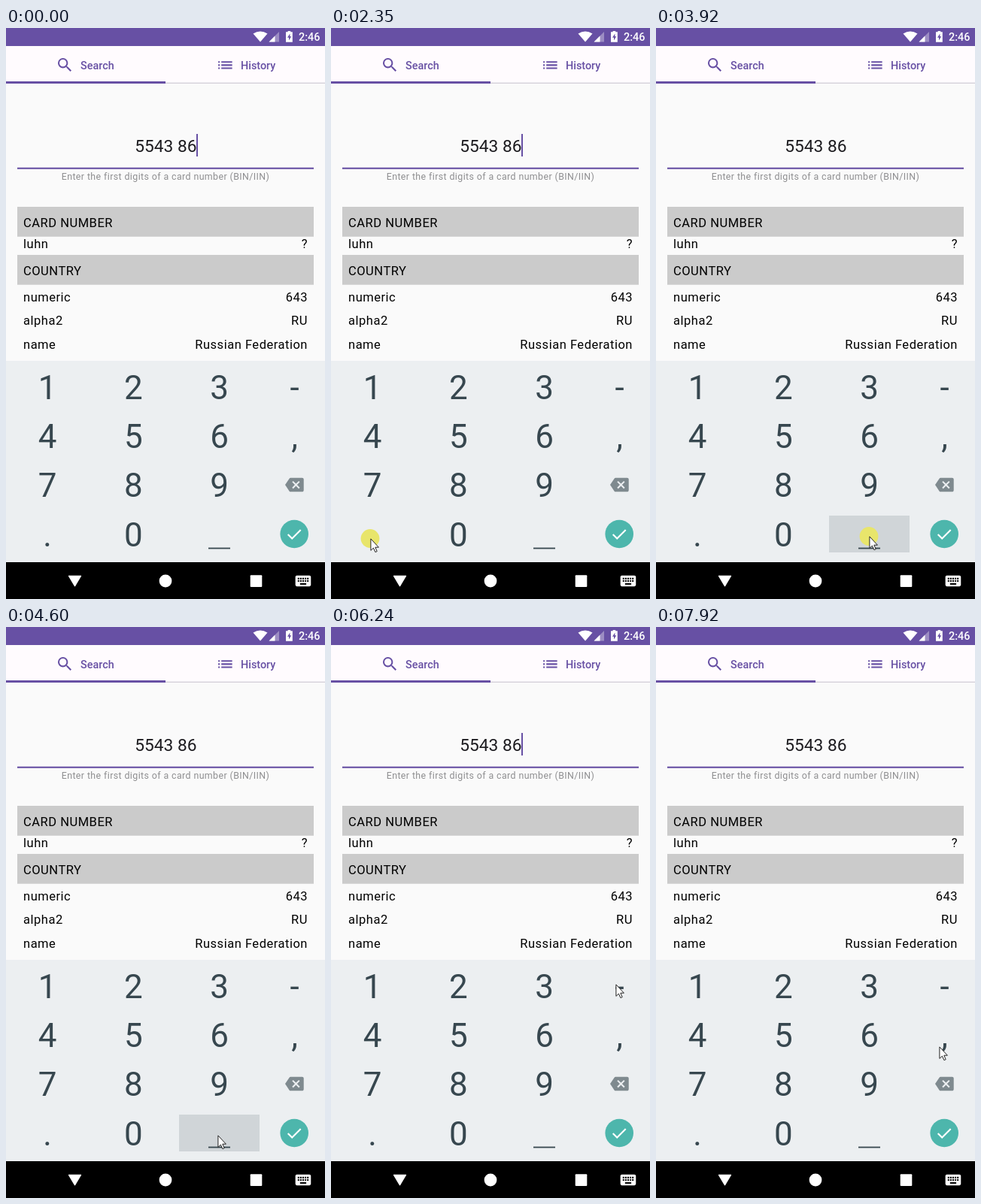
Animation of 424 by 760 pixels, one loop 8 s. Source, as an HTML page:

```html
<!DOCTYPE html>
<html lang="en">
<head>
<meta charset="utf-8">
<title>Card number lookup</title>
<style>
  html, body { margin: 0; width: 100%; height: 100%; overflow: hidden; background: #fafafa; }
  svg { display: block; width: 424px; height: 760px; font-family: Roboto, sans-serif; }

  .purple { fill: #6750a4; }
  .tab { font-size: 14.4px; font-weight: 500; }
  .input { font-size: 22.7px; fill: #1c1b1f; text-anchor: middle; }
  .hint { font-size: 12.37px; letter-spacing: .412px; fill: #8e8e90; text-anchor: middle; }
  .list { font-size: 16.5px; letter-spacing: .515px; }
  .end { text-anchor: end; }
  .keys { font-size: 44px; fill: #37474f; text-anchor: middle; }
  .press { fill: #d0d5d8; }

  .anim { animation: 8s step-end infinite; }
  .press, .dot { opacity: 0; }
  .caret { animation-name: blink; }
  .dot { animation-name: click; fill: #e8e56b; }
  .period { animation-name: period; }
  .space { animation-name: space; }
  .minus { animation-name: minus; }
  .comma { animation-name: comma; }
  .pointer { animation: move 8s linear infinite; }

  @keyframes blink {
    0%, 12.56%, 25.125%, 37.69%, 50.25%, 62.81%, 75.375%, 87.94% { opacity: 1; }
    6.28%, 18.85%, 31.41%, 43.97%, 56.53%, 69.09%, 81.66%, 94.22%, 100% { opacity: 0; }
  }
  @keyframes click {
    14.25%, 21.875%, 29.375%, 39.375%, 48.125%, 55%, 72%, 79.625%, 88%, 95.75% { opacity: 1; }
    0%, 16.125%, 23.625%, 31.125%, 42.375%, 49.875%, 56.625%, 73.75%, 82.125%, 89.75%, 97.375%, 100% { opacity: 0; }
  }
  @keyframes period {
    15.125%, 22.75%, 30.125% { opacity: 1; }
    0%, 18.5%, 25.125%, 32%, 100% { opacity: 0; }
  }
  @keyframes space {
    40.25%, 49%, 55.875% { opacity: 1; }
    0%, 43.125%, 50.625%, 58.375%, 100% { opacity: 0; }
  }
  @keyframes minus {
    72.875%, 80.5%, 88.875% { opacity: 1; }
    0%, 75.375%, 83%, 91.125%, 100% { opacity: 0; }
  }
  @keyframes comma {
    96.5% { opacity: 1; }
    98.25% { opacity: .5; }
    0%, 99%, 100% { opacity: 0; }
  }
  @keyframes move {
    0% { transform: translate(347px, 770px); animation-timing-function: step-end; }
    3.25% { transform: translate(347px, 750px); animation-timing-function: ease-in-out; }
    12.625% { transform: translate(57px, 683px); }
    13.375% { transform: translate(54px, 681px); animation-timing-function: step-end; }
    27.625% { transform: translate(52px, 679px); animation-timing-function: step-end; }
    31.125% { transform: translate(52px, 680px); animation-timing-function: ease-in-out; }
    34.375% { transform: translate(270px, 680px); animation-timing-function: step-end; }
    37.75% { transform: translate(283px, 676px); animation-timing-function: step-end; }
    52.5% { transform: translate(281px, 676px); animation-timing-function: step-end; }
    61.625% { transform: translate(281px, 676px); animation-timing-function: ease-in-out; }
    71.125% { transform: translate(378px, 474px); animation-timing-function: step-end; }
    77.125% { transform: translate(378px, 475px); animation-timing-function: step-end; }
    91.375% { transform: translate(378px, 475px); animation-timing-function: ease-in-out; }
    95.625%, 100% { transform: translate(376px, 558px); }
  }
</style>
</head>
<body>
<svg viewBox="0 0 424 760">
  <rect width="424" height="760" fill="#fafafa"/>

  <!-- Status bar -->
  <rect class="purple" width="424" height="24"/>
  <g fill="#fff">
    <path d="M338 18.5 328.5 7.4Q338 1.6 347.5 7.4Z"/>
    <path d="M363 5V18.5H349.5Z" opacity=".35"/>
    <path d="M357.5 10.5V18.5H349.5Z"/>
    <path fill-rule="evenodd" d="M374.6 5.2V4h3.6v1.2h2.6v13.6h-8.8V5.2ZM377.4 7.5 374 12.8h2v3.7l3.2-5.3h-1.8Z"/>
    <text class="tab" x="389" y="17.1">2:46</text>
  </g>

  <!-- Tabs -->
  <rect y="24" width="424" height="49" fill="#fffbfe"/>
  <rect x="212" y="72.7" width="212" height="1.1" fill="#cac5d0"/>
  <rect class="purple" y="71" width="212" height="3"/>
  <g class="purple">
    <path transform="translate(65.9 36.9) scale(1.03)" d="M15.5 14h-.79l-.28-.27A6.471 6.471 0 0 0 16 9.5 6.5 6.5 0 1 0 9.5 16c1.61 0 3.09-.59 4.23-1.57l.27.28v.79l5 4.99L20.49 19zm-6 0C7.01 14 5 11.99 5 9.5S7.01 5 9.5 5 14 7.01 14 9.5 11.99 14 9.5 14z"/>
    <path transform="translate(279 37) scale(1.03)" d="M3 7h2v2H3zM3 11h2v2H3zM3 15h2v2H3zM7 7h14v2H7zM7 11h14v2H7zM7 15h14v2H7z"/>
    <text class="tab" x="99" y="55">Search</text>
    <text class="tab" x="312" y="55">History</text>
  </g>

  <!-- Number field -->
  <text class="input" x="212.4" y="165">5543 86</text>
  <rect class="caret anim purple" x="253" y="141" width="2" height="30"/>
  <rect class="purple" x="15" y="185.7" width="394" height="2.1"/>
  <text class="hint" x="212" y="201.5">Enter the first digits of a card number (BIN/IIN)</text>

  <!-- Details -->
  <path fill="#cbcbcb" d="M15 238h394v39.7H15zM15 302h394v39.7H15z"/>
  <g class="list">
    <text x="23" y="264.5">CARD NUMBER</text>
    <text x="23" y="293">luhn</text>
    <text x="23" y="328.5">COUNTRY</text>
    <text x="23" y="364">numeric</text>
    <text x="23" y="395.3">alpha2</text>
    <text x="23" y="426.7">name</text>
    <g class="end">
      <text x="401" y="293">?</text>
      <text x="401" y="364">643</text>
      <text x="401" y="395.3">RU</text>
      <text x="401" y="426.7">Russian Federation</text>
    </g>
  </g>

  <!-- Keypad -->
  <rect y="443" width="424" height="268" fill="#eceff1"/>
  <rect class="press anim period" x="2" y="649" width="107" height="49"/>
  <rect class="press anim space" x="230" y="649" width="107" height="49"/>
  <rect class="press anim minus" x="344" y="453" width="78" height="49"/>
  <rect class="press anim comma" x="344" y="518" width="78" height="49"/>
  <g class="keys">
    <text x="55" y="493.5">1</text><text x="169.3" y="493.5">2</text><text x="283.5" y="493.5">3</text><text x="383.5" y="493.5">-</text>
    <text x="55" y="559">4</text><text x="169.3" y="559">5</text><text x="283.5" y="559">6</text><text x="383.5" y="559">,</text>
    <text x="55" y="624.3">7</text><text x="169.3" y="624.3">8</text><text x="283.5" y="624.3">9</text>
    <text x="55" y="689.7">.</text><text x="169.3" y="689.7">0</text>
    <rect x="269" y="691.6" width="29" height="1.8"/>
  </g>
  <path fill="#7f8a8f" transform="translate(371 595.7) scale(1.03)" d="M22 3H7c-.69 0-1.23.35-1.59.88L0 12l5.41 8.11c.36.53.9.89 1.59.89h15c1.1 0 2-.9 2-2V5c0-1.1-.9-2-2-2zm-3 12.59L17.59 17 14 13.41 10.41 17 9 15.59 12.59 12 9 8.41 10.41 7 14 10.59 17.59 7 19 8.41 15.41 12z"/>
  <circle cx="383.2" cy="673.5" r="18.8" fill="#4db6ac"/>
  <path d="M374.7 674 380.2 679.5 391.7 668" fill="none" stroke="#fff" stroke-width="2.1"/>

  <!-- Navigation bar -->
  <rect y="711" width="424" height="49"/>
  <g fill="#fff">
    <path d="M83.2 729.2H99.8L91.5 743.2Z" stroke="#fff" stroke-linejoin="round"/>
    <circle cx="212" cy="736" r="8.4"/>
    <rect x="324.7" y="728.3" width="15.6" height="15.6" rx="1"/>
    <path transform="translate(382.6 723.6) scale(1.03)" d="M20 5H4c-1.1 0-2 .9-2 2v10c0 1.1.9 2 2 2h16c1.1 0 2-.9 2-2V7c0-1.1-.9-2-2-2zm-9 3h2v2h-2V8zm0 3h2v2h-2v-2zM8 8h2v2H8V8zm0 3h2v2H8v-2zm-1 2H5v-2h2v2zm0-3H5V8h2v2zm9 7H8v-2h8v2zm0-4h-2v-2h2v2zm0-3h-2V8h2v2zm3 3h-2v-2h2v2zm0-3h-2V8h2v2z"/>
  </g>

  <g class="pointer">
    <circle class="dot anim" cy=".5" r="12.4"/>
    <path d="M.9.9V16.4L4.4 13.1 6.9 18.6 9.2 17.6 6.8 12.2H11.4Z" fill="#fff" stroke="#222" stroke-width="1"/>
  </g>
</svg>
</body>
</html>
```
